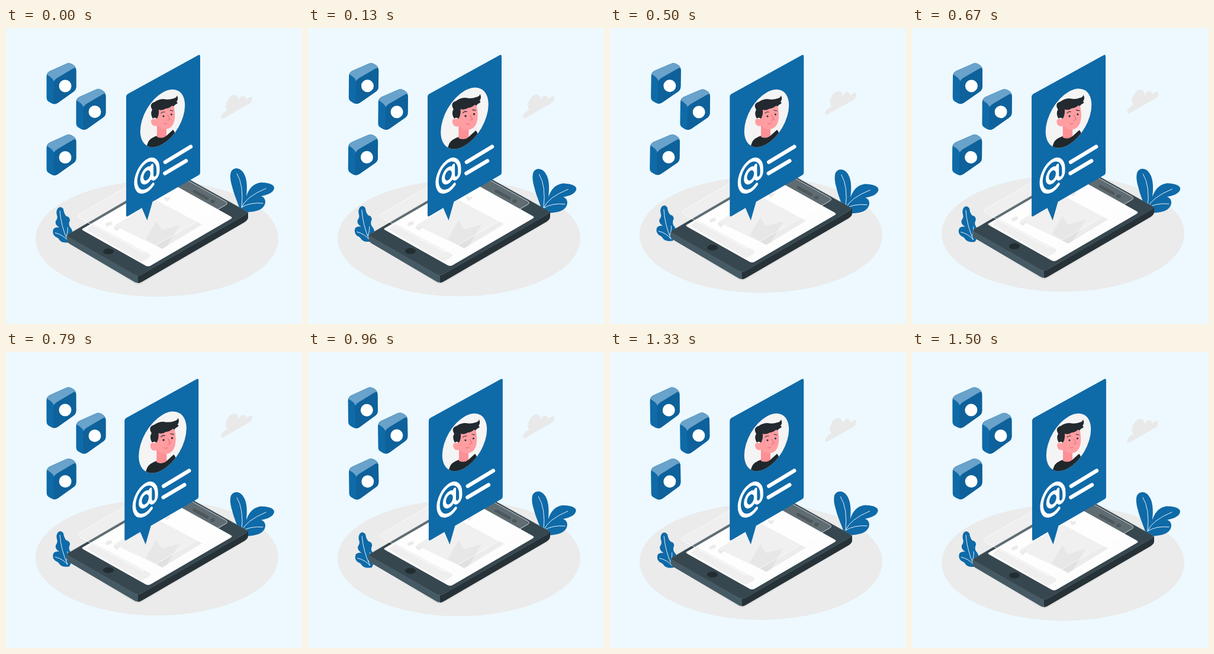
Write an HTML page that moves like this. It is 500 by 500 pixels and loops after 1540 ms.

```html
<!DOCTYPE html>
<html lang="en">
<head>
<meta charset="utf-8">
<title>Profile card over a phone</title>
<style>
  html, body { margin: 0; width: 100%; height: 100%; overflow: hidden; background: #edf9ff; }
  svg { display: block; width: 100%; height: 100%; }
  .blue { fill: #0f6aa8; }
  .line { fill: none; stroke: #fff; stroke-linecap: round; stroke-linejoin: round; }
</style>
</head>
<body>
<svg viewBox="0 0 500 500">
  <defs>
    <clipPath id="disc"><circle r="37.7" transform="matrix(1 -.577 0 1.155 264.5 152.5)"/></clipPath>
    <g id="cube">
      <path class="blue" d="M0 23Q0 17 5 14L33 1.500Q38-1 43 2L46 4Q50 7 50 13V40Q50 46 45 49L19 67.500Q13 71 8 68L3 65Q0 63 0 58Z"/>
      <path fill="#69a2ca" d="M1 20Q2 16 5 14L33 1.500Q38-1 43 2L46 4Q49 6 49.500 9Q48 8 45 9.500L18 25.500Q14 28 12.500 31Q10 25 1 20Z"/>
      <path fill="#0e619a" d="M12 36Q12 29 18 25.500L45 9.500Q50 7 50 13V40Q50 46 45 49L19 67.500Q15 70 12 69Z"/>
      <circle cx="31.500" cy="39" r="10.500" fill="#fff"/>
    </g>
    <path id="heart" fill="#e6e6e6" d="M0 5C-6 1-6-3-3-3Q-1-3 0-1Q3-4 5-2Q6 1 0 5Z"/>
  </defs>

  <ellipse data-float cx="255" cy="356" rx="205" ry="98" fill="#ebebeb"/>

  <g id="leaves">
    <path class="blue" d="M397 312C391 293 385 281 382 268C379 258 378 250 380 243C384 235 394 235 400 243C407 252 408 267 406 284C411 270 418 263 430 261C442 261 454 264 453 271C451 279 441 282 431 284C440 287 440 298 433 304C426 311 409 311 397 312Z"/>
    <path class="line" stroke-width=".9" d="M390 246Q402 265 398 303Q405 285 439 271M398 303Q412 294 434 296"/>
    <path class="blue" d="M107 362Q96 364 91 359Q88 354 84 353Q77 348 80 340Q83 336 90 337Q82 332 84 326Q88 321 86 316Q84 309 88 304Q93 300 97 306Q98 314 102 318Q108 319 108 325Q105 331 108 336Q113 341 113 350Z"/>
    <path class="line" stroke-width=".9" d="M91 309Q93 335 104 359Q96 349 83 346M102 352Q105 342 104 337"/>
  </g>

  <g data-float>
    <path fill="#dedede" d="M104 362L218 432Q223 435 230 431L405 328V320L222 420Z"/>
    <path fill="#455a64" d="M102.500 351V358Q103 362 108 365L217 429Q222 432 228 429V412Z"/>
    <path fill="#263238" d="M223 416V431Q226 431 231 428L403 328Q409 324 409 320V311Z"/>
    <path fill="#37474f" stroke="#4d6069" stroke-width=".7" d="M108 347Q99 350.500 108 354.500L217 416.500Q223 420 229 416.500L404 315.500Q411 311.500 404 308.500L305 253.500L290 245Q287 243 283 245Z"/>
    <path fill="#fdfdfd" d="M131 338Q126 340 131 342.500L235 401Q240 404 245 401L379 323Q384 320.500 379 318L275 260Q270 257 265 260Z"/>
    <ellipse cx="173" cy="377.500" rx="9" ry="5" fill="#222d32"/>
    <path class="line" style="stroke:#222d32" stroke-width="5" d="M318 276L340 288"/>
    <ellipse cx="349" cy="293" rx="4" ry="3" fill="#222d32"/>
    <path fill="#efefef" d="M147 331L244 383Q245 386 239 390L229 395L136 341Z"/>
    <path fill="#ececec" d="M183 334L254 291L331 332L264 373Z"/>
    <path fill="#e1e1e1" d="M236 357L254 326L263 341L293 333L272 368L264 373Z"/>
    <path class="line" style="stroke:#e6e6e6" stroke-width="6" d="M171 332L176 330"/>
    <use href="#heart" x="187" y="338"/>
    <use href="#heart" x="272" y="288"/>
    <path fill="#fff" fill-opacity=".2" stroke="#fff" stroke-opacity=".75" stroke-width="1" d="M123 315Q119 318 124 321L226 377Q231 380 236 377L371 299Q376 296 371 293L270 237Q264 234 258 237Z"/>
  </g>

  <path data-float fill="#e9e9e9" d="M364 153Q362 150 366 145Q369 141 374 139Q369 133 373 125Q378 113 386 113Q392 113 393 122Q397 114 402 115Q406 117 405 121Q412 115 416 117Q417 124 411 128L372 150Q367 154 364 153Z"/>

  <g id="cubes">
    <use href="#cube" x="68.500" y="59"/>
    <use href="#cube" x="118.500" y="102.500"/>
    <use href="#cube" x="68.500" y="179.500"/>
  </g>

  <g id="card">
    <path class="blue" d="M203 116Q203 113 205.500 111.500L324.500 46Q328 44 328 48V244Q328 247 325.500 248.500L247.500 293.500L238.500 325L229.500 304L206.500 317.500Q203 320 203 316Z"/>
    <path class="line" stroke-width="5.200" transform="matrix(1 -.577 0 1.155 238 249)"
      d="M8.500-10V5a5.200 6 0 0 0 10.400 0V0A18.900 21.500 0 1 0 10 18.500M8.500 0A8.500 9.500 0 1 1-8.500 0A8.500 9.500 0 1 1 8.500 0"/>
    <path class="line" stroke-width="6.500" d="M269 226.500L312 200.500M268.500 245.500L304 224.500"/>
  </g>

  <g id="avatar" clip-path="url(#disc)">
    <path fill="#f4f4f4" d="M220 95h90v115h-90z"/>
    <path fill="#20272b" d="M234 210L240 193Q243 186 255 182H271L282 172Q288 176 290 210Z"/>
    <path fill="#fb9096" d="M255 162H271V182Q264 188 255 184Z"/>
    <path fill="#ff9da1" d="M253 138L283 130Q287 146 284 158Q281 169 271 171Q261 172 257 165Q246 168 245 158Q245 152 253 154Z"/>
    <path fill="#222a2f" d="M248 153Q243 145 247 138Q241 128 251 125Q258 120 266 120Q275 122 283 119Q288 118 289 114Q292 120 288 125Q293 126 285 130Q283 134 281 131Q275 136 270 136Q264 140 258 138Q259 147 255 153Q251 150 248 153Z"/>
    <g fill="none" stroke="#263238" stroke-linecap="round" stroke-width="1.200">
      <path d="M262 144Q264 141 268 142M277 139L282 140"/>
      <path stroke="#e2737c" d="M273 147L277 154L273 156M267 161Q269 163 272 161"/>
    </g>
    <circle cx="266" cy="149" r="1.600" fill="#263238"/>
    <circle cx="279.500" cy="146" r="1.600" fill="#263238"/>
  </g>
</svg>
<script>
const LOOP = 1540;
const byId = id => document.getElementById(id);
const floaters = document.querySelectorAll('[data-float]');

// [position in loop, value]
const SHAKE = [[0, 0], [.1, -1], [.2, 2], [.3, -4], [.4, 4], [.5, -4], [.6, 4], [.7, -4], [.8, 2], [.9, -1], [1, 0]];
const BEAT = [[0, 1], [.1, 1.08], [.3, 1], [.4, 1], [.5, 1.08], [.6, 1], [1, 1]];

const linear = x => x;

// cubic-bezier(.25, .1, .25, 1)
function ease(x) {
  let lo = 0, hi = 1, u;
  for (let i = 0; i < 16; i++) {
    u = (lo + hi) / 2;
    if (.75 * u * (1 - u) + u ** 3 < x) lo = u; else hi = u;
  }
  return .3 * u * (1 - u) ** 2 + 3 * u * u * (1 - u) + u ** 3;
}

function sample(keys, p, timing) {
  const i = keys.findIndex(k => k[0] > p);
  const [p0, a] = keys[i - 1], [p1, b] = keys[i];
  return a + (b - a) * timing((p - p0) / (p1 - p0));
}

const set = (el, transform) => el.setAttribute('transform', transform);

function draw(now) {
  const p = now % LOOP / LOOP, angle = p * 2 * Math.PI;
  const lift = -4.5 * (1 - Math.cos(angle)), sway = Math.sin(angle);
  floaters.forEach(el => set(el, `translate(0 ${lift})`));
  set(byId('leaves'), `rotate(${sway} 266 298)`);
  set(byId('cubes'), `rotate(${sway} 118 154)`);
  set(byId('card'), `translate(${sample(SHAKE, p, ease)} 0)`);
  set(byId('avatar'), `translate(264.5 152.5) scale(${sample(BEAT, p, linear)}) translate(-264.5 -152.5)`);
}

const start = performance.now();
function tick() {
  draw(performance.now() - start);
  requestAnimationFrame(tick);
}
tick();
</script>
</body>
</html>
```
